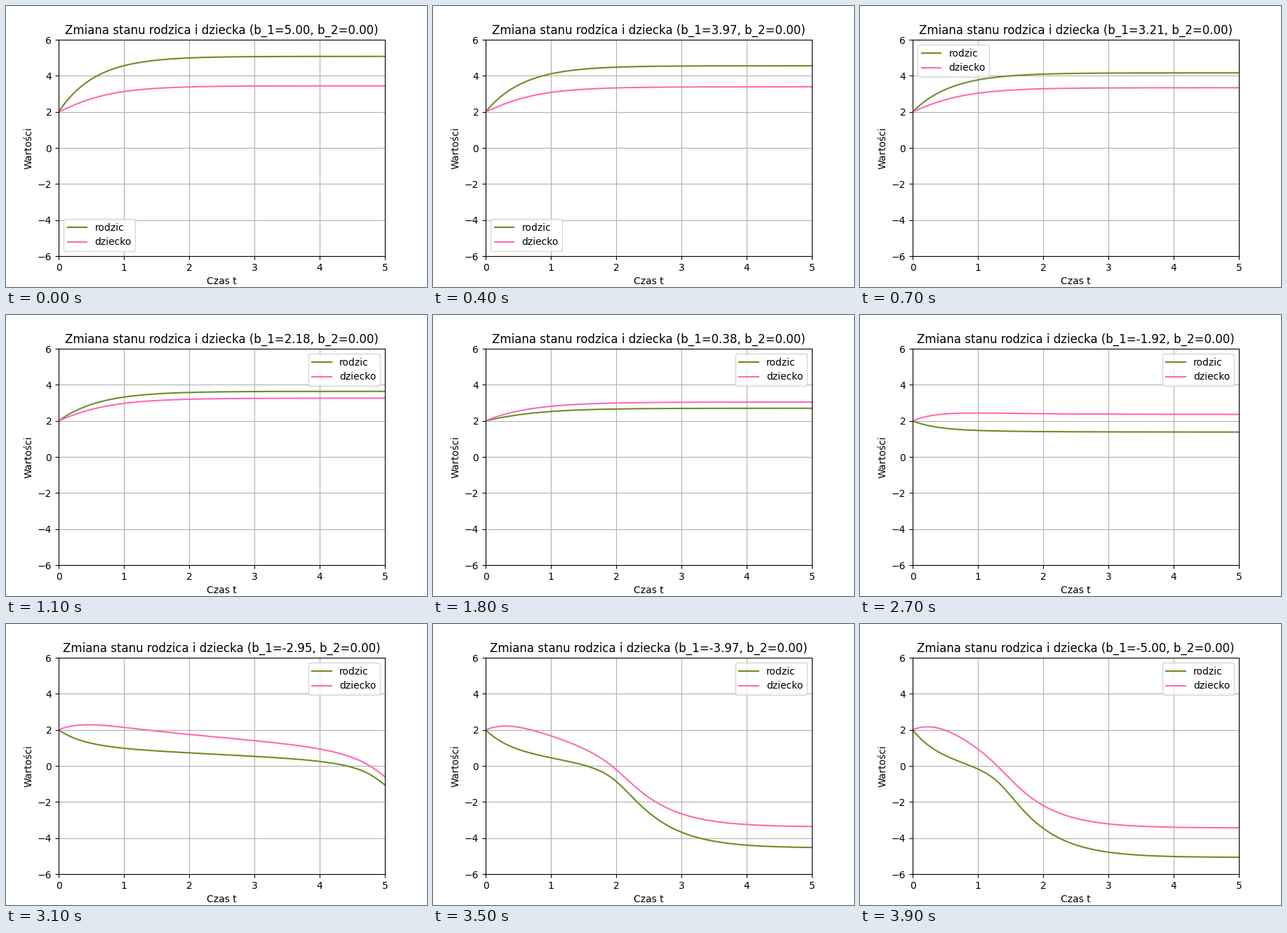
A matplotlib script for the animation above (4000 ms loop, 600 by 400 pixels).

```python
import numpy as np
import matplotlib.pyplot as plt
from matplotlib.animation import FuncAnimation

FRAMES = 40
INTERVAL = 100
B1_VALUES = np.linspace(5, -5, FRAMES)
B2 = 0.0
START = (2.0, 2.0)
TIMES = np.linspace(0, 5, 501)


def slope(state, b1, b2):
    parent, child = state
    return np.array([
        -2 * parent + 4 * np.arctan(child) + b1,
        -2 * child + 5 * np.arctan(parent) + b2,
    ])


def solve(b1, b2):
    """Integrate the coupled system with fourth-order Runge-Kutta."""
    h = TIMES[1] - TIMES[0]
    states = np.empty((len(TIMES), 2))
    states[0] = START
    for i in range(len(TIMES) - 1):
        s = states[i]
        k1 = slope(s, b1, b2)
        k2 = slope(s + h / 2 * k1, b1, b2)
        k3 = slope(s + h / 2 * k2, b1, b2)
        k4 = slope(s + h * k3, b1, b2)
        states[i + 1] = s + h / 6 * (k1 + 2 * k2 + 2 * k3 + k4)
    return states.T


fig, ax = plt.subplots(figsize=(6, 4), dpi=100)
parent_line, = ax.plot([], [], color="olivedrab", label="rodzic")
child_line, = ax.plot([], [], color="hotpink", label="dziecko")
ax.set_xlim(0, 5)
ax.set_ylim(-6, 6)
ax.set_xlabel("Czas t")
ax.set_ylabel("Wartości")
ax.grid(True)
# "best" is worked out again at every draw, so the legend avoids the curves
ax.legend(loc="best")


def update(frame):
    b1 = B1_VALUES[frame]
    parent, child = solve(b1, B2)
    parent_line.set_data(TIMES, parent)
    child_line.set_data(TIMES, child)
    ax.set_title(f"Zmiana stanu rodzica i dziecka (b_1={b1:.2f}, b_2={B2:.2f})")
    return parent_line, child_line


anim = FuncAnimation(fig, update, frames=FRAMES, interval=INTERVAL,
                     repeat=True, repeat_delay=0, blit=False)
plt.show()
```
